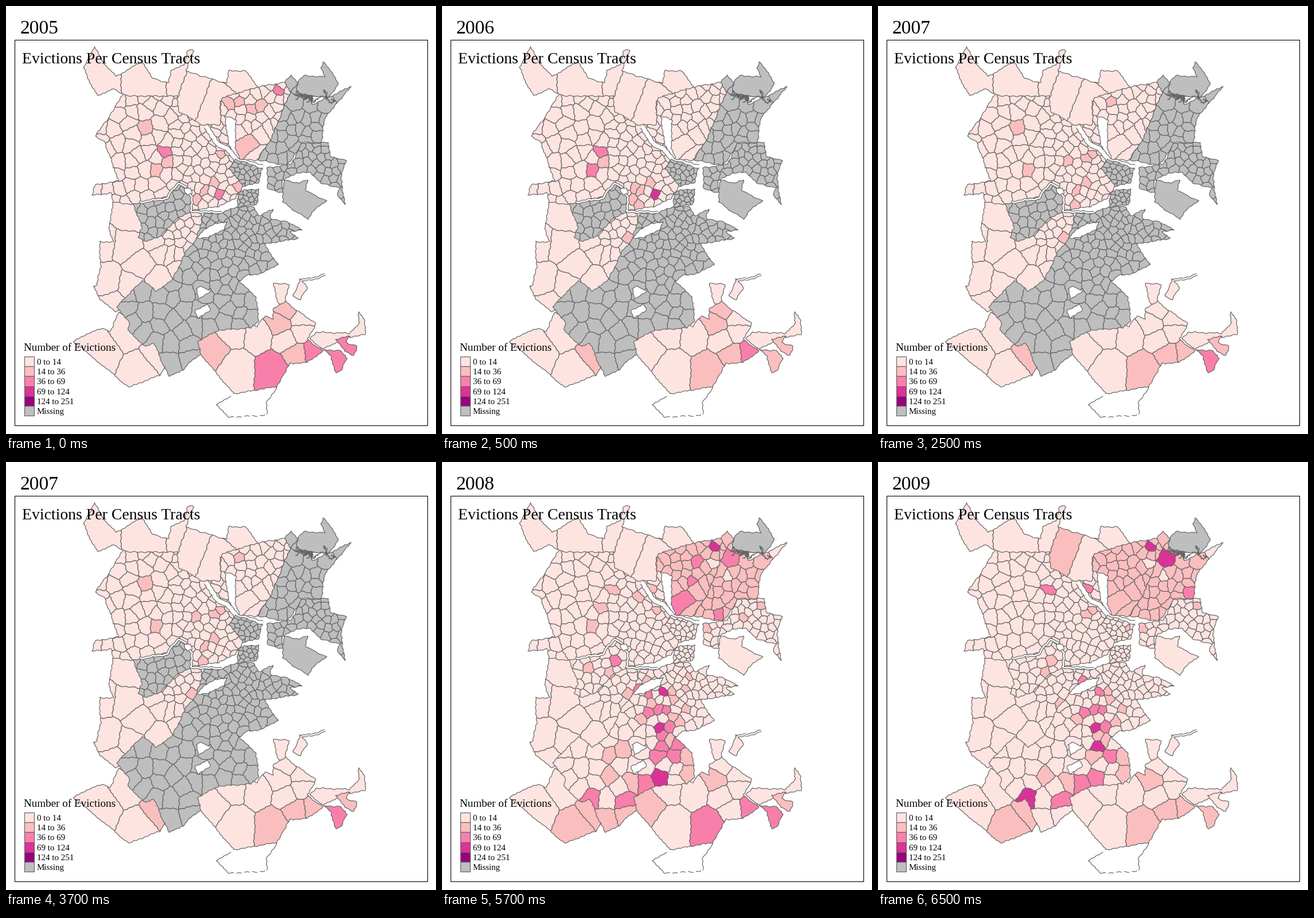
Recreate the animation shown at these times as a matplotlib script. Size 750 by 746 pixels, loop 8000 ms.

```python
import numpy as np
import matplotlib.pyplot as plt
from matplotlib.animation import FuncAnimation
from matplotlib.collections import LineCollection, PolyCollection
from matplotlib.path import Path
from matplotlib.patches import Rectangle

W, H, DPI = 750, 746, 100
CLASSES = ["#fde4e1", "#fbbebe", "#f97fab", "#dc3297", "#99017c", "#bebebe"]
LABELS = ["0 to 14", "14 to 36", "36 to 69", "69 to 124", "124 to 251", "Missing"]
BORDER = "#646464"
LINE = 0.85

fig = plt.figure(figsize=(W / DPI, H / DPI), dpi=DPI, facecolor="white")
ax = fig.add_axes([0, 0, 1, 1])
ax.set(xlim=(0, W), ylim=(H, 0))
ax.axis("off")
layers = []  # (collection, class codes); a code has one digit per year


def rough(points, closed=True):
    """Subdivide a path and bend it slightly by a fixed wave field."""
    pts = np.array(points, float)
    ends = np.roll(pts, -1, 0) if closed else pts[1:]
    out = []
    for a, b in zip(pts, ends):
        n = max(1, int(np.hypot(*(b - a)) // 3))
        out.extend(a + (b - a) * np.arange(n)[:, None] / n)
    if not closed:
        out.append(pts[-1])
    x, y = np.array(out).T
    return np.column_stack([x + 0.8 * np.sin(0.6 * y + 0.3 * x) + 0.6 * np.sin(0.17 * y),
                            y + 0.8 * np.sin(0.5 * x - 0.4 * y) + 0.6 * np.sin(0.19 * x)])


def add_polys(polys, codes, clip=None):
    coll = PolyCollection(polys, edgecolors=BORDER, linewidths=LINE, zorder=1)
    ax.add_collection(coll, autolim=False)
    if clip is not None:
        coll.set_clip_path(clip, ax.transData)
    layers.append((coll, codes))


def tract(code, *points):
    add_polys([rough(points)], [code])


def line(*points, width=LINE, color=BORDER, style="-"):
    ax.add_collection(LineCollection([rough(points, False)], colors=color, linewidths=width,
                                     linestyles=style, zorder=1), autolim=False)


def channel(width, *points):
    line(*points, width=width + 2 * LINE)
    line(*points, width=width, color="white")


def outline(edge, fill="none"):
    ax.add_collection(PolyCollection([edge], facecolors=fill, edgecolors=BORDER,
                                     linewidths=LINE, zorder=1), autolim=False)


def water(*points):
    outline(rough(points), "white")


def voronoi_cell(site, others):
    cell = [site + 160 * np.array(c) for c in ((-1, -1), (1, -1), (1, 1), (-1, 1))]
    for q in others:
        side = [np.dot(v - (site + q) / 2, q - site) for v in cell]
        kept = []
        for i, v in enumerate(cell):
            j = i - 1
            if (side[i] > 0) != (side[j] > 0):
                kept.append(cell[j] + (v - cell[j]) * side[j] / (side[j] - side[i]))
            if side[i] <= 0:
                kept.append(v)
        cell = kept
    return cell


def zone(points, marked, code="00000", gap=None):
    """Split an area into tracts around marked and evenly scattered sites."""
    edge = rough(points)
    path = Path(np.vstack([edge, edge[:1]]))
    sites = [p for group in marked.values() for p in group]
    codes = [mark for mark, group in marked.items() for _ in group]
    if gap:
        rng = np.random.default_rng(len(layers))
        tries = rng.uniform(edge.min(0), edge.max(0), (3500, 2))
        for p in tries[path.contains_points(tries)]:
            if not sites or np.hypot(*(np.array(sites) - p).T).min() > gap(*p):
                sites.append(tuple(p))
                codes.append(code)
    sites = np.array(sites, float)
    cells = []
    for s in sites:
        order = np.argsort(np.hypot(*(sites - s).T))[1:25]
        cells.append(rough(voronoi_cell(s, sites[order])))
    add_polys(cells, codes, path)
    outline(edge)


# Western and southern towns
zone([(186, 342), (240, 335), (342, 362), (335, 430), (280, 500), (191, 533), (164, 511),
      (152, 489), (158, 487), (165, 455), (163, 411), (187, 411), (179, 385), (185, 359)],
     {"01110": [(326, 404)], "00001": [(316, 421)]},
     gap=lambda x, y: 12 if x > 268 and y < 428 else 36)
zone([(197, 534), (215, 543), (275, 595), (276, 631), (268, 643), (215, 665), (118, 585),
      (143, 570), (168, 562), (182, 567)],
     {"00000": [(168, 600), (212, 570)], "00011": [(235, 630)], "01111": [(262, 608)]})
zone([(330, 585), (363, 560), (412, 545), (437, 558), (452, 541), (466, 545), (466, 527),
      (488, 514), (503, 528), (541, 553), (526, 580), (553, 602), (523, 622), (495, 623),
      (473, 663), (397, 676), (339, 606)],
     {"00000": [(400, 628), (395, 568), (440, 573), (490, 582), (515, 568), (515, 545)],
      "10010": [(362, 600)], "21121": [(468, 630)], "11011": [(478, 552)],
      "11000": [(490, 530)], "11101": [(505, 606)], "22121": [(537, 601)]})
tract("00000", (465, 482), (493, 485), (486, 517), (475, 519))
tract("00000", (513, 475), (525, 491), (513, 511), (500, 505))
channel(1.5, (514, 479), (545, 473), (556, 468))
tract("00000", (530, 578), (540, 568), (598, 570), (616, 552), (614, 533), (625, 546),
      (626, 572), (592, 578), (550, 598))
tract("21221", (553, 599), (582, 600), (595, 613), (583, 636), (574, 638), (566, 608))
tract("21110", (575, 581), (600, 574), (592, 586), (612, 592), (606, 608), (590, 602))
line((393, 681), (368, 694), (388, 717))
line((473, 663), (455, 691), (455, 713))
line((388, 717), (455, 713), style=(0, (8, 4)))

# Northern towns
zone([(205, 150), (376, 150), (388, 241), (402, 262), (390, 283), (414, 314), (400, 335),
      (368, 350), (325, 356), (323, 332), (301, 308), (280, 333), (222, 346), (186, 342),
      (184, 326), (151, 330), (155, 312), (196, 305), (172, 236), (155, 228), (190, 178)],
     {"10100": [(244, 214)], "22010": [(278, 255)], "11000": [(282, 270)],
      "12110": [(262, 286)], "10111": [(374, 258)], "00101": [(364, 266)],
      "00010": [(342, 236)], "00012": [(366, 220), (300, 222)], "00100": [(330, 270)],
      "23000": [(372, 327)], "11100": [(347, 322), (365, 308)], "10000": [(404, 313)],
      "01100": [(343, 345)], "01000": [(336, 316)], "11000 ": [(331, 338)]},
     gap=lambda x, y: 18 if x < 295 else 12)
zone([(154, 72), (168, 95), (192, 123), (238, 97), (255, 126), (283, 134), (288, 113),
      (312, 101), (316, 78), (327, 77), (314, 114), (385, 135), (388, 113), (417, 113),
      (440, 141), (374, 165), (374, 207), (341, 207), (302, 184), (298, 157), (213, 157),
      (186, 145), (159, 157), (141, 122), (136, 106)],
     {"00000": [(141, 138), (261, 133), (299, 133), (382, 165), (410, 128)],
      "00001": [(316, 139)]})
zone([(376, 160), (440, 141), (487, 133), (496, 150), (460, 237), (436, 269), (408, 268),
      (400, 245), (401, 198), (374, 190)],
     {"20033": [(476, 148)], "10111": [(407, 165)], "10011": [(389, 170), (428, 180)],
      "10021": [(445, 175), (420, 240)], "00000": [(472, 176)], "00021": [(436, 206)]},
     "00011", lambda x, y: 30 if y > 218 else 14)
channel(5, (350, 210), (366, 237), (388, 251), (402, 269), (425, 275), (448, 281))

# The city
zone([(345, 362), (372, 362), (404, 350), (432, 350), (442, 366), (466, 354), (460, 370),
      (494, 378), (517, 390), (495, 393), (510, 405), (450, 415), (475, 450), (447, 466),
      (420, 470), (406, 480), (436, 506), (441, 549), (427, 561), (371, 565), (335, 585),
      (339, 606), (309, 633), (284, 646), (258, 588), (243, 593), (212, 565), (216, 550),
      (192, 525), (238, 478), (262, 497), (290, 478), (314, 428), (332, 407)],
     {"55510": [(365, 420), (430, 374), (425, 395), (403, 443), (292, 508), (314, 504),
                (285, 622), (322, 612)],
      "55511": [(402, 398), (404, 414), (428, 430), (414, 452), (396, 484), (346, 446),
                (425, 516), (426, 542), (332, 556), (290, 547)],
      "55520": [(361, 404), (340, 392), (409, 489)], "55521": [(385, 478), (378, 511)],
      "55522": [(391, 432), (379, 430), (359, 437), (397, 460), (407, 514), (353, 557),
                (318, 590)],
      "55532": [(381, 549), (386, 400)], "55533": [(378, 462)],
      "55523": [(381, 495), (262, 582)], "55512": [(357, 380)]},
     "55500", lambda x, y: 10 + max(0, y - 400) / 18 + (5 if x < 330 else 0))
water((331, 404), (345, 390), (366, 378), (384, 376), (380, 388), (352, 403))
water((331, 492), (340, 487), (357, 498), (336, 510))
water((328, 530), (350, 519), (356, 531), (335, 543))
zone([(222, 346), (283, 331), (301, 306), (323, 332), (322, 360), (300, 369), (268, 402),
      (246, 410), (231, 404), (237, 385)],
     {"55521": [(303, 345)], "55510": [(256, 358)], "55511": [(291, 367)]},
     "55500", lambda x, y: 13)
channel(1.7, (234, 342), (280, 335), (301, 308), (312, 315), (324, 334), (323, 358),
        (376, 360))
water((310, 318), (322, 317), (325, 327), (316, 329))
zone([(400, 267), (447, 283), (440, 307), (414, 315), (390, 283)],
     {"55501": [(436, 289)]}, "55500", lambda x, y: 8)
zone([(403, 336), (410, 322), (442, 319), (437, 346), (404, 350)], {}, "55500",
     lambda x, y: 7)

# Northern shore
zone([(496, 121), (514, 137), (535, 172), (602, 140), (556, 195), (550, 238), (518, 238),
      (490, 278), (438, 268), (460, 237), (496, 150), (487, 133)],
     {"55523": [(506, 170)], "55500": [(497, 200), (590, 150)], "55512": [(540, 225)],
      "55521": [(483, 266)]},
     "55511", lambda x, y: 24 if y < 190 else 14)
tract("55555", (510, 130), (518, 121), (555, 123), (549, 108), (554, 98), (566, 113),
      (580, 136), (560, 160), (505, 152))
water((502, 152), (514, 157), (548, 157), (535, 165))
rng = np.random.default_rng(11)
for x in range(505, 560, 9):
    line(*((x, 160) + np.cumsum(rng.normal(0, 2.3, (20, 2)), 0)), width=1.1)
zone([(516, 240), (562, 238), (566, 262), (593, 270), (584, 299), (591, 347), (578, 330),
      (583, 317), (549, 309), (530, 290), (507, 291), (480, 305), (484, 326), (456, 318),
      (456, 282), (497, 276)],
     {"55511": [(463, 290), (557, 251)], "55510": [(526, 270)]},
     "55500", lambda x, y: 11)
tract("55500", (484, 303), (510, 308), (525, 303), (522, 320), (558, 340), (541, 350),
      (526, 371), (482, 342))

# Frame, titles and legend
ax.add_patch(Rectangle((15, 59), 720, 672, fill=False, ec="black", lw=0.8))


def label(x, y, text, px):
    return ax.text(x, y, text, family="Liberation Serif", size=px * 72 / DPI, va="baseline")


year_text = label(25, 48, "", 33.5)
label(28, 100, "Evictions Per Census Tracts", 27.7)
label(31, 601, "Number of Evictions", 19.2)
for i, (color, name) in enumerate(zip(CLASSES, LABELS)):
    ax.add_patch(Rectangle((32, 611 + 17.2 * i), 17, 17.2, fc=color, ec=BORDER, lw=LINE,
                           zorder=2))
    label(54, 625 + 17.2 * i, name, 15)


def update(frame):
    year = (frame + 3) // 4  # the first year is already ending when the loop starts
    year_text.set_text(str(2005 + year))
    for coll, codes in layers:
        coll.set_facecolor([CLASSES[int(code[year])] for code in codes])
    return [year_text]


anim = FuncAnimation(fig, update, frames=16, interval=500, repeat=True, repeat_delay=0)
plt.show()
```
